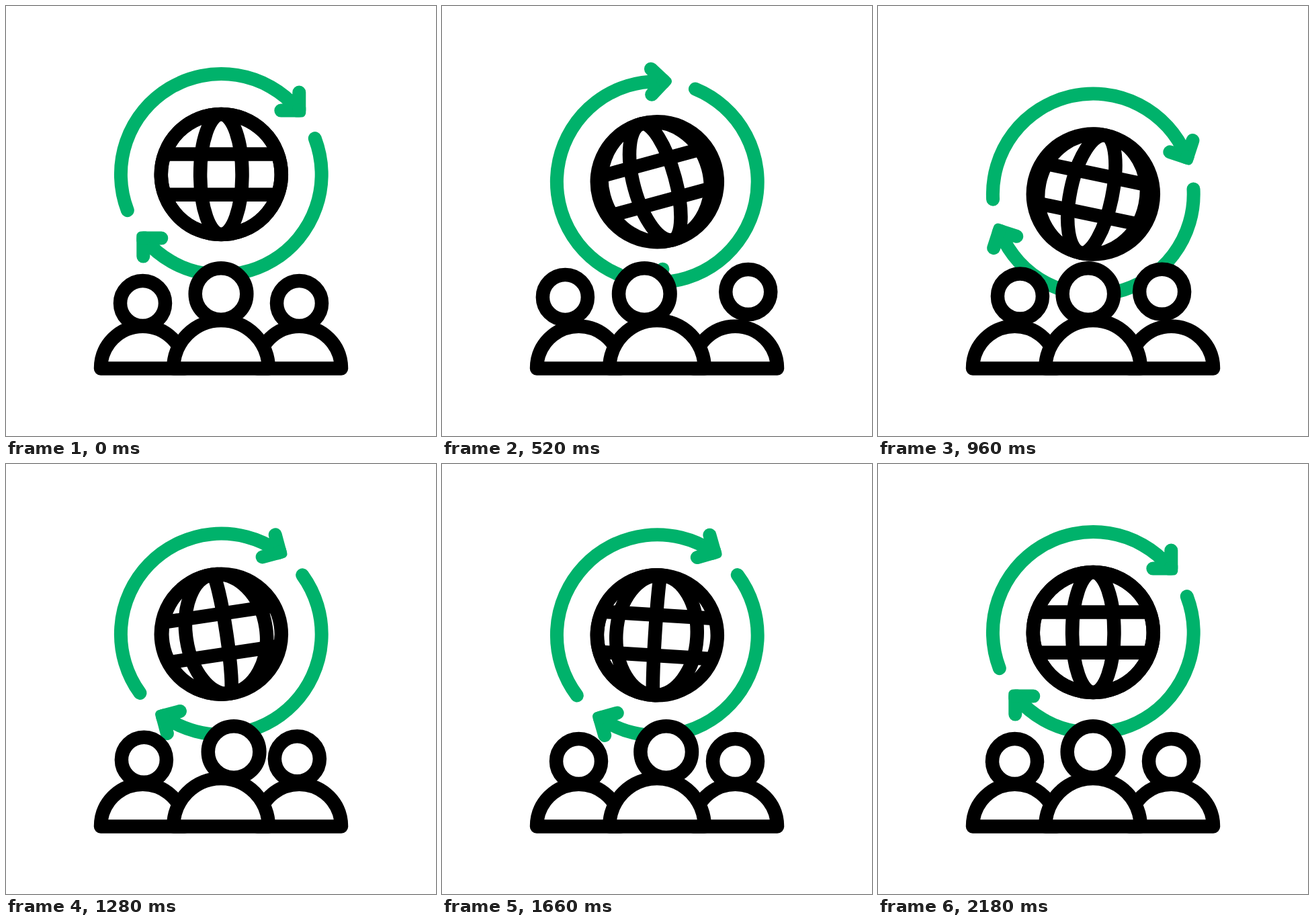
An HTML page for the animation above (2400 ms loop, 640 by 640 pixels).

```html
<!DOCTYPE html>
<html lang="en">
<head>
<meta charset="utf-8">
<title>Global community</title>
<style>
  html, body { margin: 0; width: 100%; height: 100%; overflow: hidden; background: #fff; }
  svg { display: block; width: 100vw; height: 100vh; }
  .ink { stroke: #000; stroke-width: 20.5; stroke-linejoin: round; }
  .line { fill: none; }
  .solid { fill: #fff; }
  .arrow { fill: none; stroke: #00b26b; stroke-width: 20; stroke-linecap: round; stroke-linejoin: round; }
  .tip { fill: #00b26b; }
</style>
</head>
<body>
<svg viewBox="0 0 640 640">
  <defs>
    <g id="sweep">
      <path class="arrow" d="M-139.5 53.5A149.5 149.5 0 0 1 113 -98M116 -122V-95H89"/>
      <rect class="tip" x="106" y="-105" width="20" height="20" rx="6.5"/>
    </g>
  </defs>
  <g id="ring">
    <use href="#sweep"/>
    <use href="#sweep" transform="rotate(180)"/>
  </g>
  <g id="globe" class="ink line">
    <circle r="89.5"/>
    <path d="M-84 -30H84M-84 30.2H84"/>
    <path id="meridians"/>
  </g>
  <g class="ink solid">
    <circle id="left" r="33.5"/>
    <circle id="right" r="33.5"/>
    <circle id="middle" r="38.3"/>
    <path d="M141 539.4A62.5 62.7 0 0 1 266 539.4Z"/>
    <path d="M374 539.4A62.5 62.7 0 0 1 499 539.4Z"/>
    <path d="M249.2 539.4A70.8 71.5 0 0 1 390.8 539.4Z"/>
  </g>
</svg>
<script>
const LOOP = 2400;
const R = 89.5;
const CENTER = { x: 320.3, y: 250.6 };
const RAD = Math.PI / 180;

// Smooth rise from 0 to 1 between two times.
function ramp(t, from, to) {
  const p = Math.min(1, Math.max(0, (t - from) / (to - from)));
  return p * p * (3 - 2 * p);
}

// Up during the first span, down again during the second.
const hump = (t, a, b, c, d) => ramp(t, a, b) - ramp(t, c, d);

// Swing from pose to pose; keys are [time, value].
const swing = (t, keys) => keys.slice(1).reduce(
  (v, [time, value], i) => v + (value - keys[i][1]) * ramp(t, keys[i][0], time),
  keys[0][1]);

// Poses at a steady beat.
const beat = (step, values) => values.map((v, i) => [i * step, v]);

const bounce = beat(357, [0, 47.7, -35.6, 48.5, -24.3, 15.2, 0]);
const tilt = beat(432, [0, -18.9, 14.8, -8.6, 4.4, 0]);
const sway = beat(690, [0, -22, 21.5, 0]);
const leanLeft = beat(480, [0, -11, 4.2, 0]);
const leanRight = beat(480, [0, 9.9, -6.9, 0]);
const turn = [[0, 0], [512, -46.8], [1012, 20], [1380, -22.6], [2160, 0]];
const spin = [[0, 0], [300, 21], [720, -23], [960, -2], [1540, -25], [2160, 0]];

const el = id => document.getElementById(id);
const [ring, globe, meridians, left, right, middle] =
  ['ring', 'globe', 'meridians', 'left', 'right', 'middle'].map(el);

function place(node, x, y, angle = 0) {
  node.setAttribute('transform', `translate(${x} ${y}) rotate(${angle})`);
}

// A half ellipse from pole to pole at the given longitude.
function meridian(angle) {
  const x = R * Math.sin(angle * RAD);
  return `M0 ${-R}A${Math.abs(x)} ${R} 0 0 ${x > 0 ? 1 : 0} 0 ${R}`;
}

// A head rolls around the middle of its own shoulders.
function roll(head, x, angle, radius) {
  place(head, x + radius * Math.sin(angle * RAD), 540 - radius * Math.cos(angle * RAD));
}

function draw(t) {
  const y = CENTER.y + swing(t, bounce);
  place(ring, CENTER.x, y, swing(t, turn));
  place(globe, CENTER.x, y, swing(t, tilt));

  const outer = 90 - 26 * hump(t, 0, 300, 1700, 2160);
  const longitude = swing(t, spin);
  meridians.setAttribute('d',
    [-outer, -20.4, 20.4, outer].map(a => meridian(a + longitude)).join(''));

  const lift = hump(t, 0, 400, 913, 1430);
  roll(left, 203.5, swing(t, leanLeft), 97.5 + 11 * lift);
  roll(right, 436.5, swing(t, leanRight), 97.5 + 18.5 * lift);
  place(middle, 320 + swing(t, sway), 428.5);
}

const start = performance.now();
function tick() {
  draw((performance.now() - start) % LOOP);
  requestAnimationFrame(tick);
}
draw(0);
requestAnimationFrame(tick);
</script>
</body>
</html>
```
